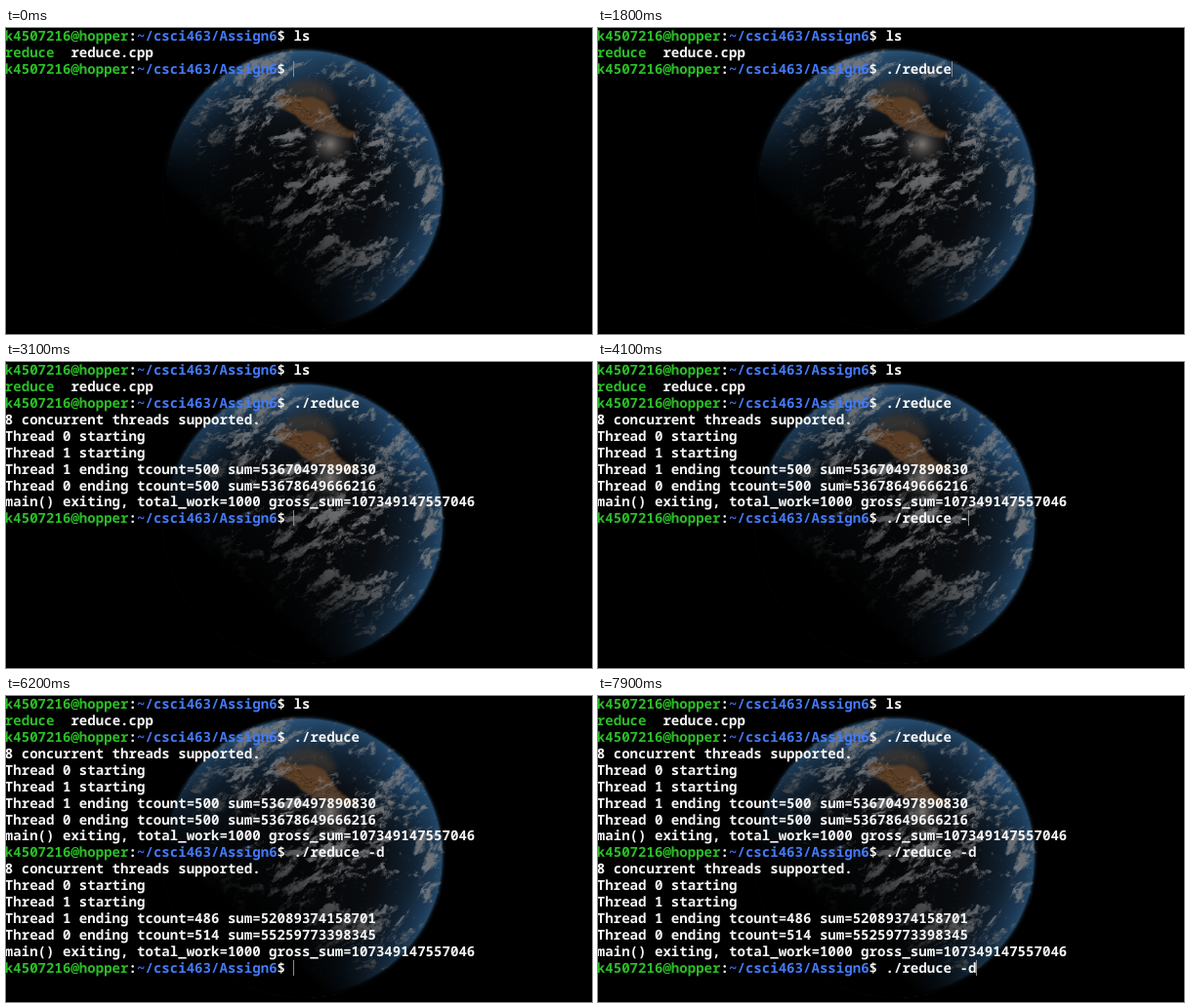
Recreate the animation shown at these times as an HTML page with a canvas. Size 600x314 px, loop 8 s.

```html
<!DOCTYPE html>
<html lang="en">
<head>
<meta charset="utf-8">
<title>Terminal session</title>
<style>
  html, body { margin: 0; width: 100%; height: 100%; overflow: hidden; background: #000; }
  #stage { position: relative; width: 600px; height: 314px; overflow: hidden; }
  canvas { position: absolute; left: 0; top: 0; }
  #screen {
    position: absolute; left: -1.2px; top: 1px; color: #f4f4f4; white-space: pre;
    font: 600 14.08px/16.93px "Noto Sans Mono", "DejaVu Sans Mono", monospace;
    font-variant-ligatures: none; text-rendering: geometricPrecision;
  }
  #screen div { position: absolute; left: 0; }
  .user { color: #2bbd26; }
  .path { color: #4479f5; }
  #cursor { position: absolute; width: 1px; height: 16px; background: #8c8c8c; }
</style>
</head>
<body>
<div id="stage">
  <canvas id="earth" width="600" height="314"></canvas>
  <div id="screen"></div>
  <div id="cursor"></div>
</div>
<script>
const LOOP = 8000, BLINK = 530, ROW = 16.93, CELL = 8.448, LEFT = -1.2;
const W = 600, H = 314, CX = 305, CY = 165, R = 145;

// ---- Planet backdrop ----
function hash(x, y) {
  let h = Math.imul(x, 374761393) + Math.imul(y, 668265263);
  h = Math.imul(h ^ (h >>> 13), 1274126177);
  return ((h ^ (h >>> 16)) >>> 0) / 4294967296;
}
const mix = (a, b, k) => a + (b - a) * k;
const ramp = (a, b, v) => {
  const k = Math.min(1, Math.max(0, (v - a) / (b - a)));
  return k * k * (3 - 2 * k);
};
function noise(x, y) {
  const i = Math.floor(x), j = Math.floor(y);
  const u = ramp(0, 1, x - i), v = ramp(0, 1, y - j);
  return mix(mix(hash(i, j), hash(i + 1, j), u), mix(hash(i, j + 1), hash(i + 1, j + 1), u), v);
}
function fbm(x, y) {
  let sum = 0, amp = 0.5;
  for (let o = 0; o < 5; o++, amp *= 0.55, x = x * 2.03 + 17, y = y * 2.03 + 9) sum += amp * noise(x, y);
  return sum / 1.06;
}

// Cloud banks: x, y, half length, half width, tilt, strength
const banks = [
  [250, 50, 60, 20, -0.4, 0.19],
  [325, 45, 45, 10, 0.2, 0.12],
  [252, 98, 42, 8, -0.95, 0.22],
  [205, 112, 42, 13, -1, 0.17],
  [298, 116, 32, 12, -0.5, 0.15],
  [345, 140, 58, 11, -0.5, 0.25],
  [238, 186, 25, 7, -0.2, 0.18],
  [320, 185, 70, 30, -0.4, 0.07],
  [373, 243, 48, 21, -0.15, 0.17],
  [388, 68, 28, 9, -0.8, 0.1],
  [432, 165, 45, 10, 1.4, 0.12]
];
function cover(x, y) {
  return banks.reduce((sum, [bx, by, l, w, a, s]) => {
    const dx = x - bx, dy = y - by, c = Math.cos(a), n = Math.sin(a);
    const p = (dx * c + dy * n) / l, q = (dy * c - dx * n) / w;
    return sum + s * Math.exp(-p * p - q * q);
  }, 0);
}

function makeCanvas() {
  const c = document.createElement("canvas");
  c.width = W;
  c.height = H;
  return c;
}
function clouds() {
  const c = makeCanvas(), g = c.getContext("2d"), img = g.createImageData(W, H);
  for (let y = 15; y < 312; y++) for (let x = 158; x < 455; x++) {
    if (Math.hypot(x - CX, y - CY) > R) continue;
    const u = x * 0.84 - y * 0.54, v = x * 0.54 + y * 0.84;
    const wx = fbm(x / 34, y / 34) * 3, wy = fbm(x / 34 + 40, y / 34 + 7) * 3;
    const n = fbm(u / 19 + wx, v / 9 + wy) + cover(x, y);
    const fine = fbm(u / 5 + wx, v / 3 + wy);
    const a = ramp(0.54, 0.86, n + (fine - 0.5) * 0.45);
    const p = (y * W + x) * 4;
    img.data[p] = 124;
    img.data[p + 1] = 126;
    img.data[p + 2] = 128;
    img.data[p + 3] = 215 * a;
  }
  g.putImageData(img, 0, 0);
  return c;
}

function fillGradient(g, grad, stops) {
  stops.forEach(([at, color]) => grad.addColorStop(at, color));
  g.fillStyle = grad;
  g.fillRect(0, 0, W, H);
}
function glow(g, x, y, r, color) {
  fillGradient(g, g.createRadialGradient(x, y, 0, x, y, r), [[0, `rgba(${color})`], [1, "rgba(0,0,0,0)"]]);
}
function drawEarth() {
  const c = makeCanvas(), g = c.getContext("2d");
  g.beginPath();
  g.arc(CX, CY, R, 0, Math.PI * 2);
  g.clip();
  fillGradient(g, g.createRadialGradient(CX, CY, 10, CX, CY, R), [
    [0, "#060708"], [0.5, "#0a0d11"], [0.75, "#10202f"], [0.92, "#1c3a56"], [0.97, "#234666"], [1, "#0c1824"]
  ]);
  g.globalCompositeOperation = "lighter";
  glow(g, 290, 50, 80, "18,32,44,0.7");
  glow(g, 405, 90, 60, "8,26,46,0.7");
  g.globalCompositeOperation = "source-over";

  g.filter = "blur(1px)";
  g.fillStyle = "#5a3e27";
  g.fill(new Path2D("M275 71 L286 68 300 71 314 70 327 76 334 88 341 98 350 105 360 107 " +
    "353 113 338 110 325 106 313 103 303 97 296 89 285 84 277 78Z"));
  g.filter = "blur(3px)";
  g.fillStyle = "rgba(72,58,44,0.6)";
  g.fill(new Path2D("M283 68 L292 56 312 52 330 59 338 73 334 81 318 72Z"));
  g.filter = "none";
  // Rough terrain
  for (let i = 0; i < 260; i++) {
    const x = 278 + hash(i, 1) * 72, y = 68 + (x - 278) * 0.5 + hash(i, 2) * 14 - 2;
    g.fillStyle = hash(i, 3) > 0.5 ? "rgba(122,86,54,0.25)" : "rgba(22,18,14,0.28)";
    g.fillRect(x, y, 1 + hash(i, 4) * 2, 1);
  }
  g.drawImage(clouds(), 0, 0);
  glow(g, 332, 119, 30, "160,152,146,0.75");

  // Night side
  fillGradient(g, g.createLinearGradient(CX - 60, CY + 68, CX + 20, CY - 23), [
    [0, "rgba(0,0,0,1)"], [0.2, "rgba(0,0,0,0.8)"], [0.45, "rgba(0,0,0,0.45)"],
    [0.7, "rgba(0,0,0,0.2)"], [1, "rgba(0,0,0,0)"]
  ]);

  const out = document.getElementById("earth").getContext("2d");
  out.fillStyle = "#000";
  out.fillRect(0, 0, W, H);
  // Fade the rim so the unlit half leaves no outline
  g.globalCompositeOperation = "destination-in";
  fillGradient(g, g.createRadialGradient(CX, CY, R - 4, CX, CY, R), [[0, "#000"], [1, "rgba(0,0,0,0)"]]);
  out.drawImage(c, 0, 0);
}

// ---- Terminal ----
const HOST = "k4507216@hopper", DIR = "~/csci463/Assign6";
const PROMPT = (HOST + ":" + DIR + "$ ").length;
const prompt = cmd => `<span class="user">${HOST}</span>:<span class="path">${DIR}</span>$ ${cmd}`;
const output = (n1, sum1, n0, sum0) => [
  "8 concurrent threads supported.",
  "Thread 0 starting",
  "Thread 1 starting",
  `Thread 1 ending tcount=${n1} sum=${sum1}`,
  `Thread 0 ending tcount=${n0} sum=${sum0}`,
  "main() exiting, total_work=1000 gross_sum=107349147557046"
];
const history = [
  [prompt("ls"), '<span class="user">reduce</span>  reduce.cpp'],
  [prompt("./reduce"), ...output(500, "53670497890830", 500, "53678649666216")],
  [prompt("./reduce -d"), ...output(486, "52089374158701", 514, "55259773398345")]
];

// Time, finished commands, typed text
const steps = [
  [0, 1, ""],
  [500, 1, "."],
  [670, 1, "./"],
  [1780, 1, "./reduce"],
  [2900, 2, ""],
  [3400, 2, "./reduce"],
  [3800, 2, "./reduce "],
  [4000, 2, "./reduce -"],
  [4390, 2, "./reduce -d"],
  [4790, 3, ""],
  [6340, 3, "./reduce -d"]
];
const screenBox = document.getElementById("screen");
const cursor = document.getElementById("cursor");
let shown = null;

function render(t) {
  const step = steps.filter(s => s[0] <= t).pop();
  const [start, done, typed] = step;
  if (step !== shown) {
    shown = step;
    const lines = [...history.slice(0, done).flat(), prompt(typed)];
    screenBox.innerHTML = lines.map((s, i) => `<div style="top:${(i * ROW).toFixed(2)}px">${s}</div>`).join("");
    cursor.style.left = Math.round(LEFT + (PROMPT + typed.length) * CELL - 0.3) + "px";
    cursor.style.top = Math.round((lines.length - 1) * ROW) + "px";
  }
  cursor.style.visibility = Math.floor((t - start) / BLINK) % 2 ? "hidden" : "visible";
}

drawEarth();
const begin = performance.now();
function tick() {
  render((performance.now() - begin) % LOOP);
  requestAnimationFrame(tick);
}
tick();
</script>
</body>
</html>
```
